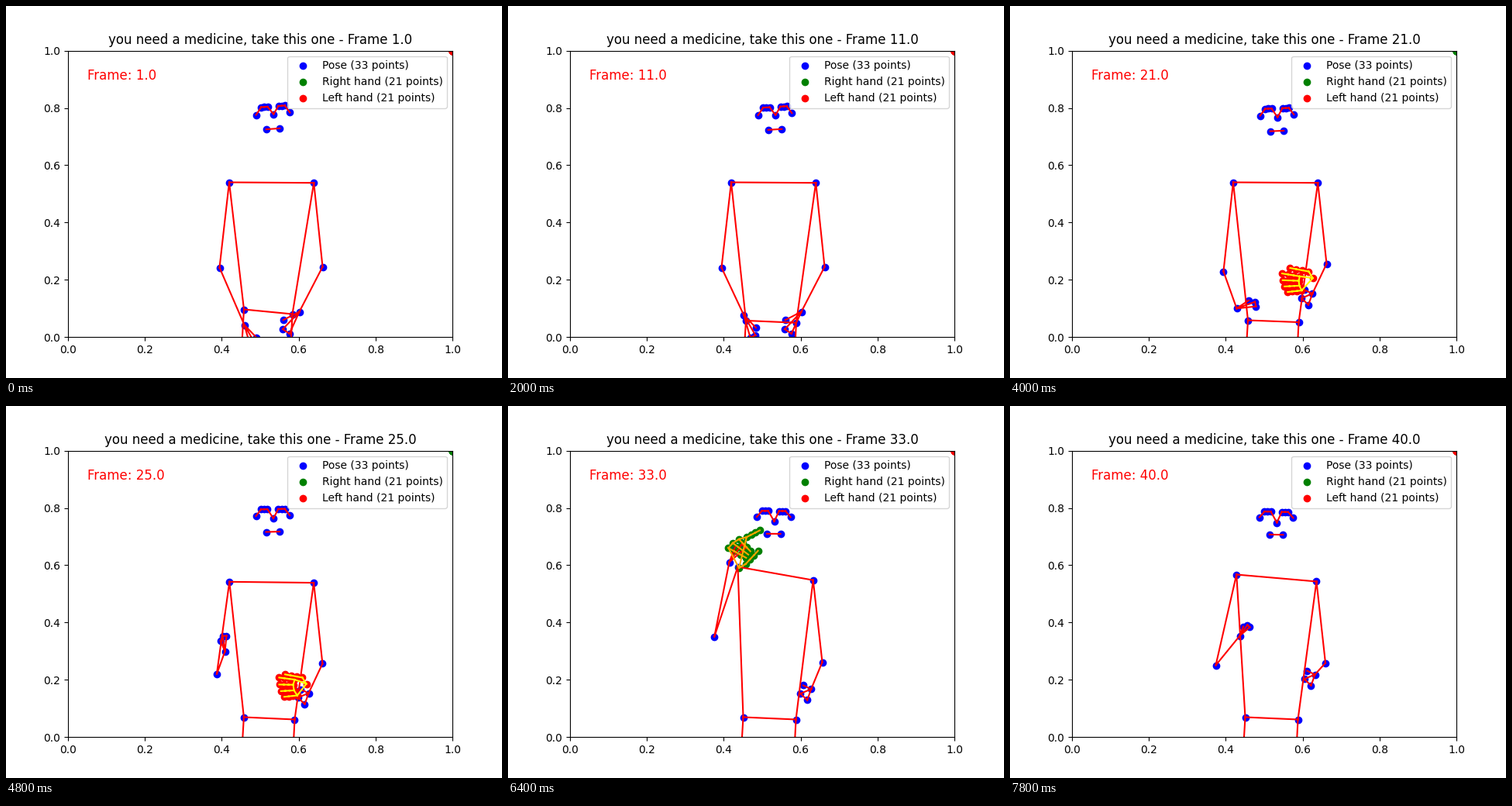
Write a matplotlib script that moves like this. It is 640 px wide and 480 px high and loops after 8 s.

```python
import numpy as np
import matplotlib.pyplot as plt
from matplotlib.animation import FuncAnimation

COUNT = 40
LEFT_SEEN = range(15, 27)
RIGHT_SEEN = range(27, 39)

POSE_EDGES = [
    (0, 1), (1, 2), (2, 3), (3, 7), (0, 4), (4, 5), (5, 6), (6, 8), (9, 10),
    (11, 12), (23, 24)]
for side in (0, 1):
    POSE_EDGES += [(a + side, b + side) for a, b in (
        (11, 13), (13, 15), (15, 17), (15, 19), (15, 21), (17, 19), (11, 23), (23, 25))]
HAND_EDGES = [(b + i, b + i + 1) for b in range(1, 21, 4) for i in range(3)]
HAND_EDGES += [(0, 1), (0, 5), (5, 9), (9, 13), (13, 17), (0, 17)]


def ease(n, start, end):
    u = np.clip((n - start) / (end - start), 0, 1)
    return u * u * (3 - 2 * u)


def polar(angle, radius):
    a = np.radians(angle)
    return np.array([radius * np.cos(a), -radius * np.sin(a)])


def to_data(pts):
    """Stage pixels to axes units."""
    return (np.asarray(pts) - (79.5, 426.7)) / (496, -369.6)


def face(n):
    """Landmarks 0-10: a mirrored face that slowly nods and rolls."""
    nod = np.clip((n - 1) / 35, 0, 1) ** 1.8
    roll = -0.07 + 0.09 * nod
    cx = 344 - 1.7 * (ease(n, 23, 33) - ease(n, 35, 45))

    def pair(dx, y):
        return [(cx + s * dx, y + s * dx * roll) for s in (1, -1)]

    eyes = [pair(dx, 129 + 7 * nod) for dx in (7, 11.3, 15.3)]
    ears = pair(21.8, 138.5 + 5 * nod)
    mouth = pair(8.8, 158 + 7.5 * nod)
    nose = (cx + 0.7, 139 + 11 * nod)
    return [nose, *(e[0] for e in eyes), *(e[1] for e in eyes), *ears, *mouth]


def palm(wrist, angle, size, fan):
    """Pinky, index and thumb landmarks around a wrist."""
    return [wrist + polar(angle - fan, size), wrist + polar(angle, size),
            wrist + polar(angle + fan, 0.75 * size)]


def pose_points(n):
    swing = np.clip((n - 1) / 16, 0, 1)
    sink = ease(n, 1, 15)
    reach = ease(n, 11, 22)      # left forearm comes up
    pull = ease(n, 17, 25)       # right hand turns and draws in
    lift = ease(n, 20.5, 31)     # right forearm goes up
    rise = ease(n, 24, 33)       # right shoulder and elbow follow
    settle = ease(n, 30, 40)
    drop = ease(n, 35, 45)
    shrug = rise - drop

    p = np.zeros((33, 2))
    p[:11] = face(n)
    p[11] = 396.7 - 3.5 * shrug, 227.7 - 3.5 * shrug
    p[12] = 287.5 + 8.5 * shrug, 227 - 20 * shrug
    p[13] = 408 - 3 * shrug, 336 - 4 * reach - 2 * shrug
    p[14] = 275 - 9 * lift - settle, 337 + 10 * pull - 50 * rise + 74 * drop
    p[15] = 378 + 12 * reach + 3 * settle, 394 - 24 * reach - 24 * settle
    p[16] = (307 - 5 * swing - 20 * pull + 14 * settle,
             411 - 20 * swing - 190 * (lift - drop))
    p[23] = 369 + 3 * sink - rise, 397 + 14 * sink - 7 * pull
    p[24] = 306.5 - 3.5 * rise, 391 + 18 * sink - 8 * pull
    p[25] = p[23] + (-6, 120)
    p[26] = p[24] + (-7, 120)

    size = 31 - 16 * reach
    p[17:22:2] = palm(p[15], 180 + 1.5 * size, size, 1.8 * size - 75)
    size = 30 - 10 * pull + 8 * rise - 22 * drop
    p[18:23:2] = palm(p[16], 160 * pull - 60 - 45 * rise, size, 14)
    return p


def hand(wrist, thumb, knuckles, tips, pointing=False):
    """21 landmarks; knuckles and tips are (angle, step, radius, growth) fans."""
    ends = [(polar(*thumb[0]), polar(*thumb[1]))]
    for k in range(4):
        ends.append([polar(a + k * step, r + k * grow)
                     for a, step, r, grow in (knuckles, tips)])
    if pointing:
        ends[1][1] = polar(tips[0] + 5, 1.35 * knuckles[2])
    pts = [wrist]
    for base, tip in ends:
        pts += [wrist + base + u * (tip - base) for u in np.linspace(0, 1, 4)]
    return np.array(pts)


def left_hand(n, pose):
    g = ease(n, 17, 25)
    return hand(pose[15] + (4 - 7 * g, 16 * g - 28),
                [(122, 10.5 - g), (156, 34 - 4 * g)],
                (185 - 25 * g, 13 + 11 * g, 18 - 2 * g, 2 - g),
                (176 - 9 * g, 10.5 + 4 * g, 44 - 8 * g, -1))


def right_hand(n, pose):
    return hand(pose[16] + (12.5, 10 - 12 * ease(n, 30, 40)),
                [(30, 10), (42, 33)], (76, 14, 41, -4), (56, -0.5, 31, -5),
                pointing=True)


def segments(pts, edges):
    gap = [(np.nan, np.nan)]
    return np.vstack([np.vstack([pts[[a, b]], gap]) for a, b in edges]).T


fig, ax = plt.subplots(figsize=(6.4, 4.8), dpi=100)
ax.set(xlim=(0, 1), ylim=(0, 1))
pose_dots = ax.scatter([], [], color="blue", label="Pose (33 points)")
right_dots = ax.scatter([], [], color="green", label="Right hand (21 points)")
left_dots = ax.scatter([], [], color="red", label="Left hand (21 points)")
pose_line, = ax.plot([], [], color="red", lw=1.5)
right_line, = ax.plot([], [], color="orange", lw=1.5)
left_line, = ax.plot([], [], color="yellow", lw=1.5)
counter = ax.text(0.05, 0.9, "", color="red", fontsize=12)
title = ax.set_title("", fontsize=12)
ax.legend(loc="upper right")


def show(pts, edges, dots, line):
    pts = to_data(pts)
    dots.set_offsets(pts)
    line.set_data(*segments(pts, edges))


def park(dots, line):
    """An undetected hand rests in the corner."""
    dots.set_offsets(np.ones((21, 2)))
    line.set_data([], [])


def draw(i):
    n = i + 1
    pose = pose_points(n)
    show(pose, POSE_EDGES, pose_dots, pose_line)
    for shape, seen, dots, line in (
            (right_hand, RIGHT_SEEN, right_dots, right_line),
            (left_hand, LEFT_SEEN, left_dots, left_line)):
        if n in seen:
            show(shape(n, pose), HAND_EDGES, dots, line)
        else:
            park(dots, line)
    counter.set_text(f"Frame: {n:.1f}")
    title.set_text(f"you need a medicine, take this one - Frame {n:.1f}")
    return []


anim = FuncAnimation(fig, draw, frames=COUNT, interval=200, repeat=True,
                     repeat_delay=0, blit=False)
plt.show()
```
